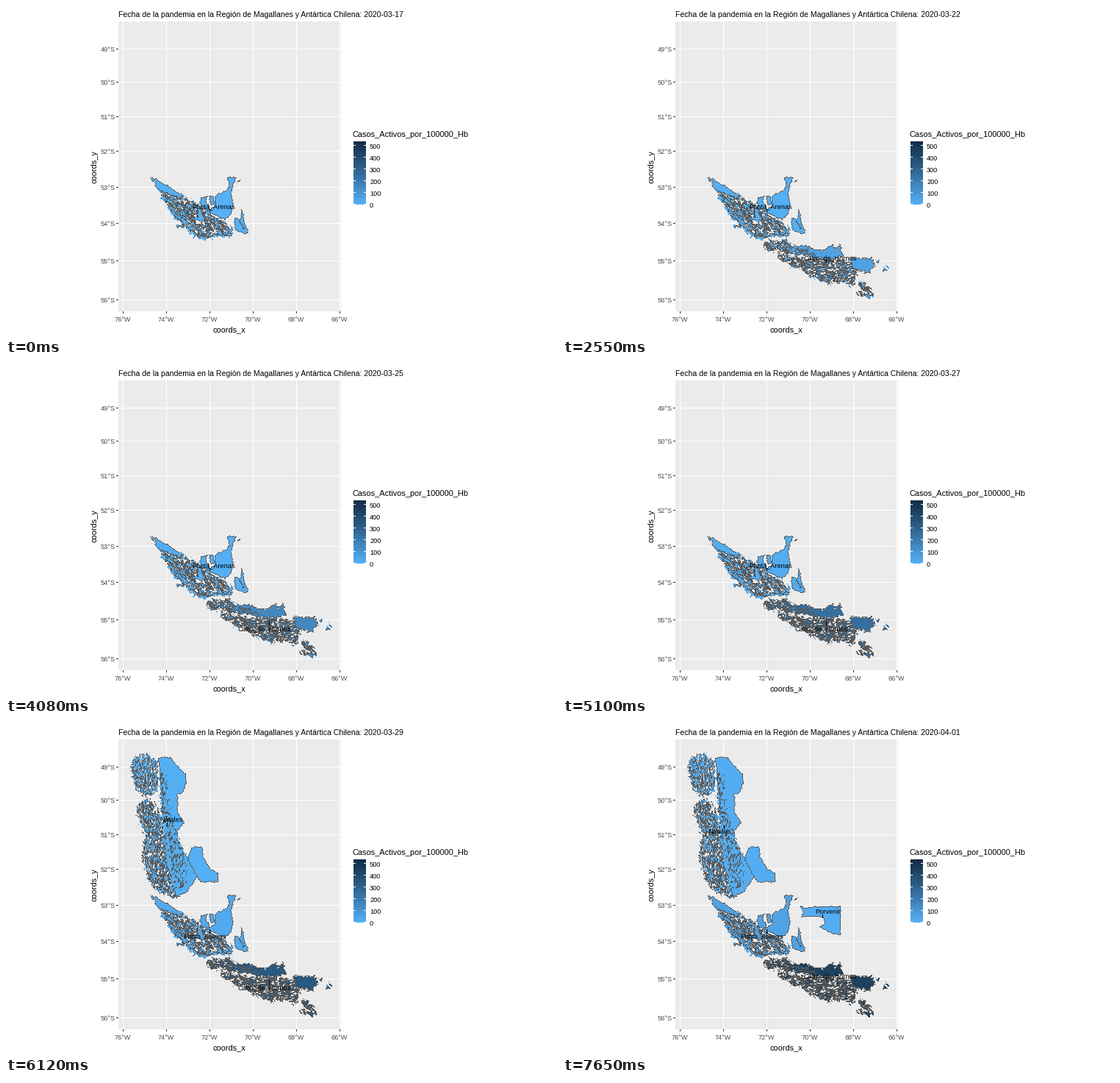
A matplotlib script that plays this animation: 750 px wide and 450 px high, repeating every 8 s.

```python
import numpy as np
import matplotlib.pyplot as plt
from matplotlib.animation import FuncAnimation
from matplotlib.path import Path

W, H = 750, 450
LOOP, STEP, TICK = 8000, 510, 50
DAYS = 16
VMAX = 535
FILL, COAST = 1, 2
GREY = (89, 89, 89)

plt.rcParams["font.family"] = ["Liberation Sans", "DejaVu Sans"]
rng = np.random.default_rng(11)
yy, xx = np.mgrid[0:H, 0:W] + 0.5


def ramp(value):
    """Light-to-dark blue scale of the legend."""
    colours = (86, 177, 247), (51, 106, 152), (19, 43, 67)
    return [np.interp(value, (0, VMAX / 2, VMAX), c) for c in zip(*colours)]


def grain(dx, dy):
    """Unit-variance noise, slightly streaked along (dx, dy)."""
    n = rng.standard_normal((H, W))
    n = n + 0.8 * (np.roll(n, 1, 0) + np.roll(n, 1, 1))
    n = sum(np.roll(n, (k * dy, k * dx), (0, 1)) for k in (-1, 0, 1))
    return n / n.std()


DIAG, UPRIGHT, FLAT = grain(1, 1), grain(0, 1), grain(1, 0)


def land(kind, points, rough=0.5):
    """Solid ground with a one-pixel coast."""
    pts = np.column_stack([(xx + rough * DIAG).ravel(), (yy + rough * FLAT).ravel()])
    m = Path(points).contains_points(pts).reshape(H, W)
    core = m.copy()
    for shift in (1, -1):
        core &= np.roll(m, shift, 0) & np.roll(m, shift, 1)
    kind[m] = COAST
    kind[core] = FILL


def isles(kind, spine, field, sea=-1.1, ground=0.65, rough=1.5):
    """Broken coast along a spine of (x, y, half width): noise splits water, coast and fill."""
    t = np.linspace(0, len(spine) - 1, 12 * len(spine))
    path = zip(*(np.interp(t, range(len(spine)), c) for c in zip(*spine)))
    gap = np.min([np.hypot(xx - x, yy - y) - w for x, y, w in path], axis=0)
    m = (gap < rough * DIAG) & (field > sea)
    kind[m] = COAST
    kind[m & (field > ground)] = FILL


def punta_arenas(k):
    isles(k, [(210, 247, 4), (241, 276, 16), (268, 298, 19), (290, 302, 11), (303, 306, 7)], DIAG)
    isles(k, [(235, 300, 2), (241, 299, 3)], DIAG)
    isles(k, [(210, 261, 1), (215, 261, 1)], DIAG)
    isles(k, [(260, 275, 3), (263, 290, 5)], DIAG, -3, -0.5)
    land(k, [(196, 232), (202, 234), (222, 246), (241, 259), (236, 262), (207, 250)], 0.8)
    land(k, [(263, 267), (266, 260), (274, 258), (272, 267), (277, 271), (276, 278), (267, 277)])
    land(k, [(276, 258), (283, 258), (284, 270), (278, 271)])
    land(k, [(301, 233), (313, 233), (307, 254), (310, 270), (306, 284), (298, 291),
             (273, 279), (284, 272), (285, 258), (300, 250), (304, 245)])
    isles(k, [(314, 241, 0.6), (318, 237, 0.6)], DIAG, -3, 3, 0.5)
    land(k, [(321, 274), (325, 295), (331, 309), (324, 310), (311, 303), (311, 288), (319, 290)])
    isles(k, [(318, 293, 1), (325, 304, 2)], DIAG, -3, 0.4, 0.5)


def cabo_de_hornos(k):
    isles(k, [(296, 341, 4), (330, 352, 9), (362, 361, 17), (386, 361, 14), (394, 377, 4)], FLAT, ground=0.9)
    isles(k, [(279, 326, 6), (300, 327, 9), (312, 331, 5)], FLAT, ground=0.9)
    land(k, [(300, 317), (310, 327), (327, 325), (352, 333), (367, 324), (371, 330), (378, 324),
             (380, 341), (361, 345), (318, 338)], 1)
    isles(k, [(315, 331, 4), (340, 337, 3)], FLAT, -3, 0.3)
    land(k, [(391, 342), (422, 343), (424, 354), (416, 363), (394, 357)], 1)
    isles(k, [(402, 391, 3), (418, 391, 5), (407, 379, 4)], DIAG, -0.6, 1.3)
    isles(k, [(435, 360, 1.5), (440, 357, 2)], DIAG)
    isles(k, [(425, 348, 1.5), (428, 348, 1.5)], DIAG)


def natales(k):
    isles(k, [(188, 60, 19), (192, 83, 15)], UPRIGHT, -1, 0.4)
    isles(k, [(193, 118, 15), (203, 150, 13), (202, 185, 17), (212, 212, 16), (228, 228, 8)], UPRIGHT)
    land(k, [(208, 45), (223, 45), (245, 69), (246, 80), (240, 95), (233, 96), (235, 122),
             (243, 134), (233, 146), (234, 163), (264, 203), (246, 229), (232, 235), (218, 190), (210, 95)])
    land(k, [(252, 168), (267, 166), (268, 180), (279, 198), (289, 202), (289, 215), (264, 215), (247, 185)])
    isles(k, [(213, 70, 4), (220, 140, 8), (237, 190, 11), (234, 212, 12)], UPRIGHT, -3, -0.35)


def porvenir(k):
    land(k, [(322, 246), (328, 250), (347, 248), (378, 247), (378, 287), (366, 285), (348, 276),
             (356, 272), (355, 264), (342, 261), (324, 263), (327, 256)], 0.3)


# place: (shape, first day, cases per 100000, anchor, label spots, days at the second spot)
PLACES = {
    "Punta_Arenas": (punta_arenas, 0, lambda d: 2 * 1.24 ** d,
                     (277, 279), [(282, 272), (270, 288)], {2, 6, 7, 9, 12, 15}),
    "Cabo_de_Hornos": (cabo_de_hornos, 3, lambda d: 49 * max(1, round(9.2 / (1 + np.exp((9.6 - d) / 1.7)))),
                       (358, 348), [(364, 342), (352, 358)], {6, 8, 10, 11, 12}),
    "Natales": (natales, 11, lambda d: 2 * (d - 9),
                (219, 138), [(225, 130), (213, 146)], {14, 15}),
    "Porvenir": (porvenir, 15, lambda d: 14, (353, 263), [(360, 255)], set()),
}

XT = range(159, 456, 59)
YT = (58, 103, 150, 197, 246, 295, 346, 399)


def backdrop():
    img = np.full((H, W, 3), 255, np.uint8)
    img[21:415, 153:456] = 235
    for x in XT:
        img[21:415, x] = 255
        img[415:418, x] = 51
    for y in YT:
        img[y, 153:456] = 255
        img[y, 150:153] = 51
    for y in range(184, 270):
        img[y, 473:490] = ramp((269.5 - y) * 500 / 80.5)
    for i in range(6):
        y = int(269.9 - 16.1 * i)
        img[y, 473:476] = img[y, 487:490] = 255
    return img


def shape(draw):
    kind = np.zeros((H, W), int)
    draw(kind)
    return kind


def day_map(day):
    img = base.copy()
    for name, (_, first, cases, *_) in PLACES.items():
        if day >= first:
            img[shapes[name] == FILL] = ramp(cases(day))
            img[shapes[name] == COAST] = GREY
    return img


base = backdrop()
shapes = {name: shape(place[0]) for name, place in PLACES.items()}
maps = [day_map(d) for d in range(DAYS)]

fig = plt.figure(figsize=(7.5, 4.5), dpi=100)
ax = fig.add_axes([0, 0, 1, 1])
ax.axis("off")
pic = ax.imshow(maps[0], extent=(0, W, H, 0), interpolation="nearest", aspect="auto")
ax.set(xlim=(0, W), ylim=(H, 0))


def write(x, y, s, px, color="black", ha="left", va="baseline", **kw):
    return ax.text(x, y, s, fontsize=px * 0.72, color=color, ha=ha, va=va, **kw)


title = write(153, 15, "", 10.55)
write(304, 443, "coords_x", 11, ha="center")
write(121, 219, "coords_y", 11, ha="center", va="center", rotation=90)
write(472, 178, "Casos_Activos_por_100000_Hb", 10.95)
for i, x in enumerate(XT):
    write(x, 429, f"{76 - 2 * i}°W", 9.1, "#4d4d4d", "center")
for i, y in enumerate(YT):
    write(149, y + 4, f"{49 + i}°S", 9.3, "#4d4d4d", "right")
for i in range(6):
    write(495, 274 - 16.1 * i, str(100 * i), 9.1)

labels = {name: write(0, 0, name, 9.15, ha="center") for name in PLACES}
leaders = {name: ax.plot([], [], color="black", lw=0.72)[0] for name in PLACES}


def date(day):
    return np.datetime64("2020-03-17") + day


def update(i):
    day = min((i * TICK + TICK - 1) // STEP, DAYS - 1)
    pic.set_data(maps[day])
    title.set_text(f"Fecha de la pandemia en la Región de Magallanes y Antártica Chilena: {date(day)}")
    for name, (_, first, _, (ax_, ay), spots, moved) in PLACES.items():
        x, y = spots[day in moved]
        labels[name].set_position((x, y + 3))
        leaders[name].set_data([ax_, ax_], [ay, y + 4 * np.sign(ay - y)])
        for part in (labels[name], leaders[name]):
            part.set_visible(day >= first)
    return [pic, title, *labels.values(), *leaders.values()]


anim = FuncAnimation(fig, update, frames=LOOP // TICK, interval=TICK, repeat=True, repeat_delay=0, blit=False)
plt.show()
```
